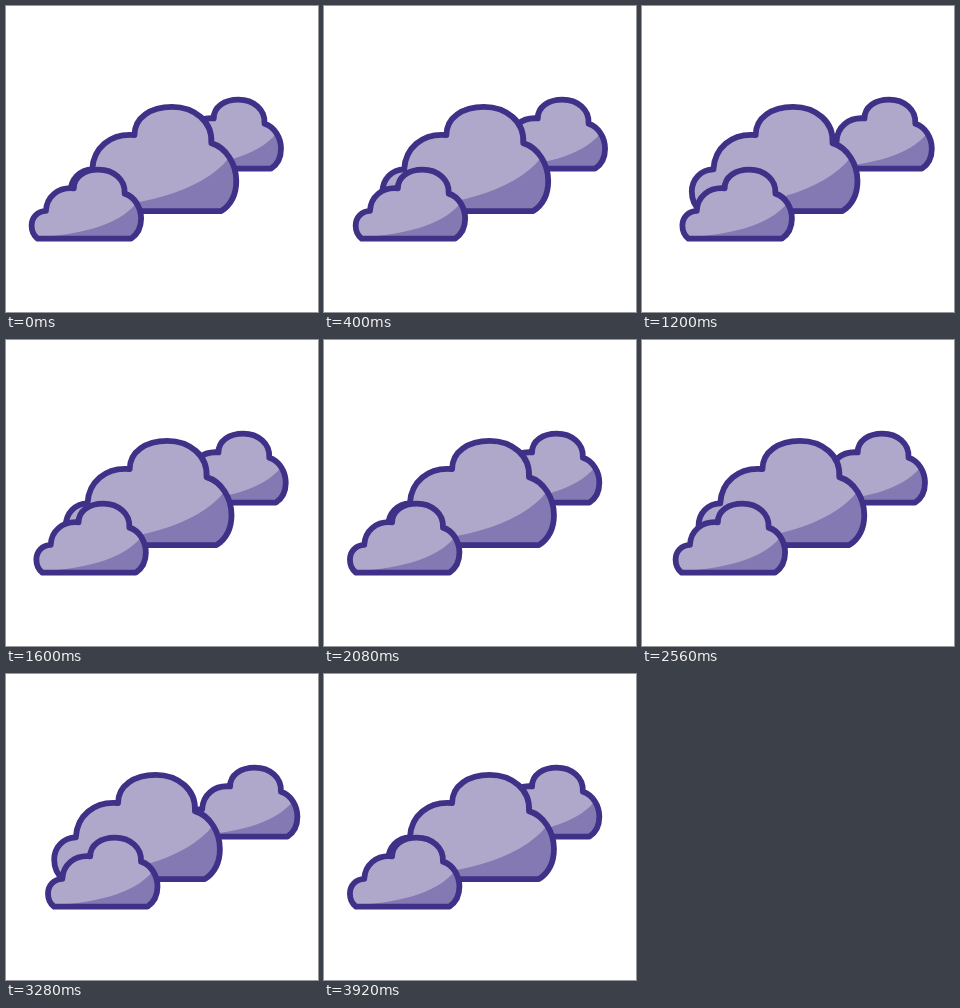
Animation of 312x306 px, one loop 4 s. Source, as an HTML page with a canvas:

```html
<!DOCTYPE html>
<html lang="en">
<head>
<meta charset="utf-8">
<title>Drifting clouds</title>
<style>
  html, body { margin: 0; width: 100%; height: 100%; overflow: hidden; background: #fff; }
  canvas { display: block; }
</style>
</head>
<body>
<canvas id="stage" width="312" height="306"></canvas>
<script>
const ctx = document.getElementById('stage').getContext('2d');
const STEP = 80, STEPS = 50, OUTLINE = 5.8;

const body = new Path2D(
  'M6 69 C2 66 0 61 0 56 C0 48 6 41.5 14.3 41.3 C15 27.5 26 17.3 42.2 18.7 ' +
  'C42.2 7 53 0 67 0 C82 0 94 10 93 24 C103 27 109.5 38 109.5 49 ' +
  'C109.5 58 105.5 65 99.5 69 Z');
const shade = new Path2D('M6 67.5 C52 65 93 54 108 29 L115 29 L115 75 L6 75 Z');

const clouds = [
  { x: 165.5, y: 93.7, scale: 1, dir: 1 },
  { x: 64.6, y: 100.8, scale: 1.513, dir: -1 },
  { x: 25.6, y: 163.6, scale: 1, dir: 1 }
];

// Drift out and back: [step, offset]
const keys = [[0, 0], [4, 4], [7, 11.3], [9, 16.4], [11.8, 20.3],
              [15, 14.8], [18, 8], [21, 3.5], [25, 0]];

function slope(i) {
  if (i === 0 || i === 4 || i === keys.length - 1) return 0;
  const [a, b] = [keys[i - 1], keys[i + 1]];
  return (b[1] - a[1]) / (b[0] - a[0]);
}

function drift(step) {
  const k = Math.min(step, STEPS - step);
  const i = Math.max(1, keys.findIndex(key => key[0] >= k));
  const [k0, v0] = keys[i - 1], [k1, v1] = keys[i];
  const span = k1 - k0, u = (k - k0) / span, w = 1 - u;
  return w * w * ((1 + 2 * u) * v0 + u * span * slope(i - 1)) +
         u * u * ((1 + 2 * w) * v1 - w * span * slope(i));
}

function drawCloud({ x, y, scale, dir }, offset) {
  ctx.save();
  ctx.translate(x + dir * offset, y);
  ctx.scale(scale, scale);
  ctx.fillStyle = '#b0a8cb';
  ctx.fill(body);
  ctx.save();
  ctx.clip(body);
  ctx.fillStyle = '#8579b4';
  ctx.fill(shade);
  ctx.restore();
  ctx.strokeStyle = '#3e3187';
  ctx.lineWidth = OUTLINE / scale;
  ctx.lineJoin = 'round';
  ctx.stroke(body);
  ctx.restore();
}

function render(now) {
  const offset = drift(Math.floor(now / STEP) % STEPS);
  ctx.fillStyle = '#fff';
  ctx.fillRect(0, 0, 312, 306);
  clouds.forEach(cloud => drawCloud(cloud, offset));
}

const start = performance.now();
function tick() {
  render(performance.now() - start);
  requestAnimationFrame(tick);
}
tick();
</script>
</body>
</html>
```
